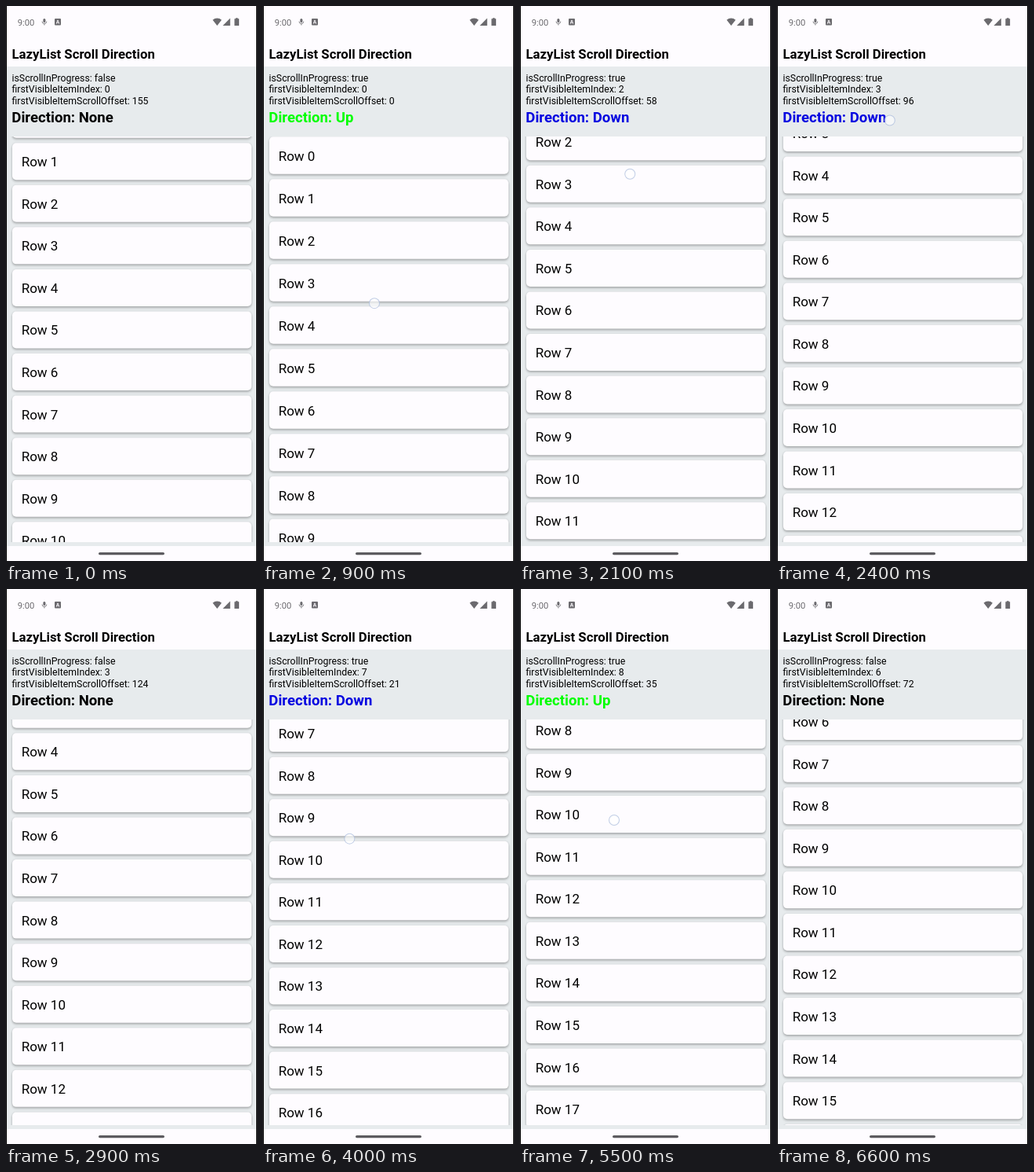
Recreate the animation shown at these times as an HTML page. Size 320 by 706 pixels, loop 6700 ms.

```html
<!DOCTYPE html>
<html lang="en">
<head>
<meta charset="utf-8">
<title>LazyList Scroll Direction</title>
<style>
  html, body { margin: 0; width: 100%; height: 100%; overflow: hidden; background: #fefcff; }
  #stage {
    position: relative; width: 320px; height: 706px; overflow: hidden;
    background: #fefcff; color: #000; font-family: Roboto, sans-serif;
  }
  #stage > * { position: absolute; }
  .edge { top: 0; width: 1px; height: 706px; background: #000; }
  .panel { left: 1px; top: 77px; width: 318px; height: 610px; background: #e7ebed; }
  svg { left: 0; top: 0; }
  .info { font-size: 12.3px; }
  .bold { font-weight: 700; }
  #list { left: 1px; top: 166px; width: 318px; height: 515.5px; overflow: hidden; }
  #rows { position: absolute; inset: 0; transform-origin: 0 0; }
  .row {
    position: absolute; left: 6.5px; top: 0; width: 305px; height: 47.1px;
    box-sizing: border-box; padding-left: 12.2px; border-radius: 5px;
    background: #fefcff; font-size: 17px; line-height: 48px; white-space: pre;
    box-shadow: 0 2px 3px rgba(0, 0, 0, .24), 0 0 3px rgba(0, 0, 0, .1);
  }
  #touch {
    left: -7px; top: -7px; width: 14px; height: 14px; box-sizing: border-box;
    border: 1px solid rgba(150, 172, 212, .6); border-radius: 50%;
    background: rgba(255, 255, 255, .6);
  }
</style>
</head>
<body>
<div id="stage">
  <div class="panel"></div>
  <div id="list"><div id="rows"></div></div>
  <svg width="320" height="706" viewBox="0 0 320 706">
    <g fill="#6b6a6e">
      <text x="14.8" y="24.5" font-size="11.2">9:00</text>
      <!-- microphone -->
      <rect x="47.4" y="16" width="3" height="5" rx="1.5"/>
      <path d="M46 19.6a2.9 2.9 0 0 0 5.8 0M48.9 22.5v2" fill="none" stroke="#6b6a6e" stroke-width=".8"/>
      <!-- keyboard badge -->
      <rect x="62" y="16" width="8" height="8.4" rx="1"/>
      <path d="M64.2 22.6 66 17.9l1.8 4.7M64.8 21.2h2.4" fill="none" stroke="#fefcff" stroke-width=".9"/>
      <!-- wifi, signal, battery -->
      <path d="M263.5 17.7a8.2 8.2 0 0 1 11.4 0L269.2 25z"/>
      <path d="M285.8 15.4v9.6h-9.4z"/>
      <path d="M292.8 15.2h2.8v1.1h1.5v8.8h-5.8v-8.8h1.5z"/>
    </g>
    <text class="bold" x="7.4" y="67.2" font-size="16.75">LazyList Scroll Direction</text>
    <text class="info" id="busy" x="7.5" y="95.5"></text>
    <text class="info" id="index" x="7.5" y="110"></text>
    <text class="info" id="offset" x="7.5" y="124.5"></text>
    <text class="bold" id="direction" x="7.3" y="148.4" font-size="18.6"></text>
    <rect x="118" y="695" width="84" height="3.2" rx="1.6" fill="#5d5c60"/>
  </svg>
  <div id="touch"></div>
  <div class="edge" style="left:0"></div>
  <div class="edge" style="left:319px"></div>
</div>
<script>
  const LOOP = 6700, STEP = 100;
  const UNIT = 0.2943;     // stage pixels per device pixel
  const PITCH = 182;       // device pixels from row to row
  const STRETCH = 7.2e-5;  // overscroll stretch per device pixel
  const COLORS = { None: '#000', Up: '#00ff00', Down: '#0505e0' };

  const linear = u => u;
  const easeIn = u => u * u;
  const easeOut = power => u => 1 - (1 - u) ** power;

  // Each move: start, end, value reached, easing.
  // Scroll is in device pixels; below zero it is overscroll.
  const scrollMoves = [
    [600, 1700, -285, easeOut(3)],
    [1700, 2500, 657, easeOut(2)],
    [2600, 2900, 670, linear],
    [3800, 4500, 1515, easeOut(4)],
    [5300, 5700, 1419, easeIn],
    [5800, 6000, 1210, linear],
    [6300, 6600, 1164, easeOut(2)]
  ];
  const touchXMoves = [
    [900, 1700, 129, linear],
    [1700, 2500, 144, easeOut(2)],
    [3500, 3600, 103, linear],
    [3800, 4500, 112, easeOut(5)],
    [5300, 5700, 128, linear]
  ];
  const touchYMoves = [
    [600, 1700, 432, easeOut(3)],
    [1700, 2500, 141, easeOut(2)],
    [3500, 3600, 535, linear],
    [3800, 4500, 268, easeOut(5)],
    [5300, 5700, 320, linear],
    [5800, 6000, 372, linear],
    [6300, 6600, 383, easeOut(2)]
  ];
  const directions = [
    [0, 'None'], [700, 'Up'], [1200, 'None'], [1900, 'Down'], [2900, 'None'],
    [3900, 'Down'], [4800, 'None'], [5400, 'Up'], [6600, 'None']
  ];

  const el = id => document.getElementById(id);
  const within = (t, ...spans) => spans.some(([from, to]) => t >= from && t < to);

  function follow(moves, value, t) {
    for (const [start, end, goal, ease] of moves) {
      if (t <= start) break;
      value += (goal - value) * ease(Math.min(1, (t - start) / (end - start)));
    }
    return value;
  }

  const rows = Array.from({ length: 22 }, (_, i) => {
    const row = document.createElement('div');
    row.className = 'row';
    row.textContent = 'Row ' + i;
    el('rows').append(row);
    return row;
  });

  function draw(t) {
    const pull = follow(scrollMoves, 155, t);
    const scroll = Math.max(0, Math.round(pull));
    const stretch = 1 + Math.max(0, -pull) * STRETCH;
    const direction = directions.filter(([start]) => start <= t).pop()[1];

    el('rows').style.transform = `scaleY(${stretch})`;
    rows.forEach((row, i) => {
      row.style.transform = `translateY(${0.3 + (i * PITCH - scroll) * UNIT}px)`;
    });

    el('busy').textContent = 'isScrollInProgress: ' + within(t, [700, 2800], [3900, 6500]);
    el('index').textContent = 'firstVisibleItemIndex: ' + Math.floor(scroll / PITCH);
    el('offset').textContent = 'firstVisibleItemScrollOffset: ' + scroll % PITCH;
    el('direction').textContent = 'Direction: ' + direction;
    el('direction').style.fill = COLORS[direction];

    const x = follow(touchXMoves, 142, t), y = follow(touchYMoves, 292, t);
    const touch = el('touch').style;
    touch.visibility = within(t, [600, 2800], [3600, 6500]) ? 'visible' : 'hidden';
    touch.transform = `translate(${x}px, ${y}px)`;
  }

  function tick() {
    const t = performance.now() % LOOP;
    draw(Math.floor(t / STEP) * STEP);
    requestAnimationFrame(tick);
  }
  tick();
</script>
</body>
</html>
```
